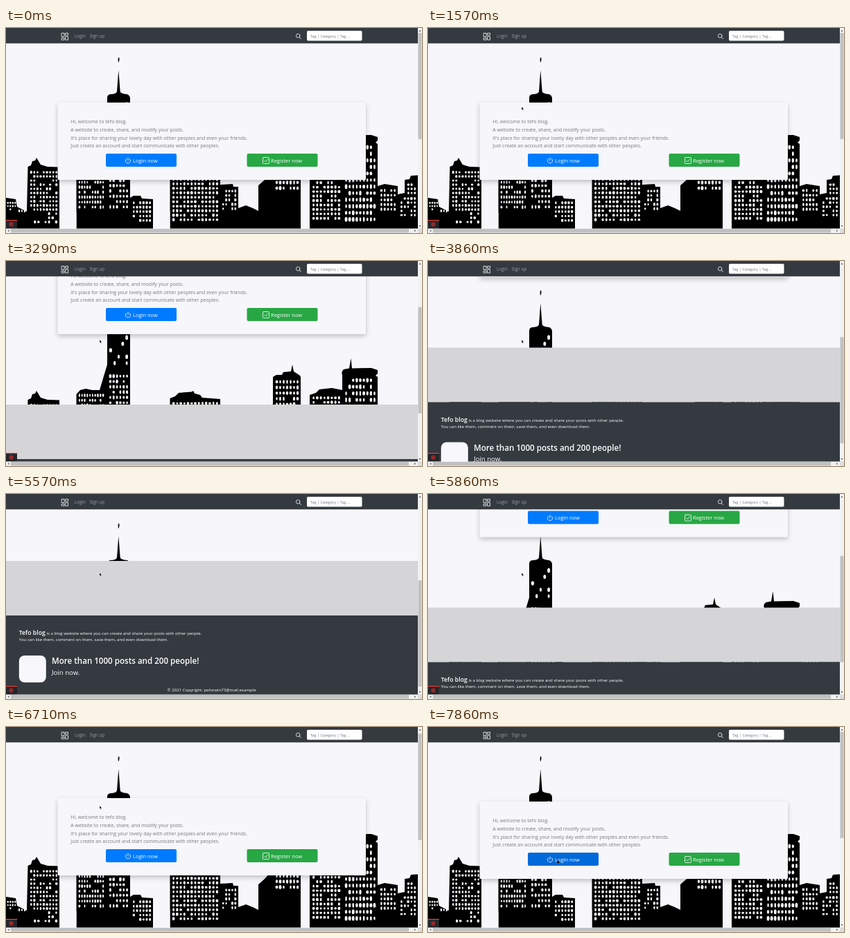
Write an HTML page that moves like this. It is 600 px wide and 297 px high and loops after 8 s.

```html
<!DOCTYPE html>
<html lang="en">
<head>
<meta charset="utf-8">
<title>Blog welcome page</title>
<style>
  html, body { margin: 0; height: 100%; overflow: hidden; background: #f7f6fa; }
  svg { display: block; width: 100vw; height: 100vh; }
  text { font-family: "Open Sans", "Noto Sans", sans-serif; fill: #fff; white-space: pre; }
  .lead text { font-size: 7.02px; fill: #777a7e; }
  .btn { font-size: 7.5px; }
  .small { font-size: 6.1px; }
  .line { fill: none; stroke: #fff; stroke-width: .8; stroke-linecap: round; }
  .card { fill: #f7f6fa; filter: drop-shadow(0 3px 3.5px rgba(0, 0, 0, .22)); }
</style>
</head>
<body>
<svg viewBox="0 0 600 297">
  <rect width="600" height="297" fill="#f7f6fa"/>

  <!-- fixed skyline -->
  <path d="M0 246 14 248 16 259 30 266 31.500 201 36 199 38 193 42 192 44 188 47 193 50 198 60 201 77 201.500V300H0Z
    M101.500 300V193L107 187 115 185 124 187 135 187 146 150V101Q146 97 150 96Q159 96 160 92L162.300 61 164.700 92Q165 95 175 96Q179 98 179 102V246L184 243 194 243 196 247 212 248V300Z
    M162 43Q163.500 41 163.500 46L162.500 50Q161 48 162 43Z
    M236.500 300V199L244 196 249 191 268 189.500 270 188 272 192 280 194 283 198 309 200V227L327 226 328 230 335 230V261L346 257 356 261 364 265V228L372 221 385 207V168L390 165 398 165 400 161 411 160 413 150 415 160 424 166 425 168V300Z
    M438 300V194L447 191 452 186 470 184 485 187V165Q483 161 487 157L495 155.500 497.500 141 499 155.500 527 155 536 158V163L533 166 536 168V229L546 226 565 229V241L575 239V220L582 219 584 214 600 213V300Z"/>
  <path d="M77 267 78 300H101.500V267ZM212 265V300H236.500V265ZM425.300 260V300H438V260Z" fill="#f7f6fa"/>
  <g id="windows" fill="#f7f6fa"></g>

  <!-- scrolling page -->
  <g id="page">
    <rect y="322" width="594" height="79" fill="#d5d4d7"/>
    <rect y="401" width="594" height="130" fill="#343a40"/>
    <rect class="card" x="74.500" y="108" width="444.500" height="112" rx="1.500"/>
    <g class="lead">
      <text x="93.300" y="138.300">Hi, welcome to tefo blog.</text>
      <text x="93.300" y="150">A website to create, share, and modify your posts.</text>
      <text x="93.300" y="161.700">It's place for sharing your lovely day with other peoples and even your friends.</text>
      <text x="93.300" y="173.300">Just create an account and start communicate with other peoples.</text>
    </g>
    <rect id="login" x="144" y="182" width="102" height="19" rx="2"/>
    <path class="line" d="M173.700 189.500A3.600 3.600 0 1 0 178.300 189.500M176 188V192"/>
    <text class="btn" x="183" y="194.500">Login now</text>
    <rect x="347.500" y="182" width="102" height="19" rx="2" fill="#28a745"/>
    <rect class="line" x="370.500" y="187.500" width="9" height="9" rx="1"/>
    <path class="line" d="M372.700 192 374.500 194 377.800 190"/>
    <text class="btn" x="382" y="194.500">Register now</text>

    <text class="small" x="18.800" y="429.200"><tspan font-size="8.700" font-weight="600">Tefo blog</tspan> is a blog website where you can create and share your posts with other people.</text>
    <text class="small" x="18.800" y="438.300">You can like them, comment on them, save them, and even download them.</text>
    <rect x="18.800" y="459" width="39" height="39" rx="8" fill="#f8f7fb"/>
    <text x="66" y="471.200" font-size="11.600" font-weight="600">More than 1000 posts and 200 people!</text>
    <text x="66" y="486.500" font-size="9.600">Join now.</text>
    <text class="small" x="296.700" y="511.300" text-anchor="middle">© 2021 Copyright: pelorwin73@mail.example</text>
  </g>

  <!-- navigation bar -->
  <rect width="594" height="22.300" fill="#343a40"/>
  <path class="line" d="M80.500 7.500h3.500v5h-3.500zM86 7.500h3.500v3h-3.500zM80.500 14.500h3.500v2.700h-3.500zM86 12.500h3.500v4.700h-3.500z"/>
  <g font-size="6.200">
    <text x="99" y="13.700" fill-opacity=".5">Login</text>
    <text x="120.700" y="13.700" fill-opacity=".5">Sign up</text>
  </g>
  <path class="line" d="M423.300 13.300 425.500 15.700M424 11.300a2.800 2.800 0 1 1-5.600 0a2.800 2.800 0 1 1 5.600 0"/>
  <rect x="434" y="4" width="79.500" height="14.500" rx="1.800" fill="#fff"/>
  <text x="439" y="13.600" font-size="5.450" style="fill:#6c757d">Tag | Category | Tag ...</text>

  <!-- corner badge -->
  <rect y="278" width="16" height="12.500" fill="#24262b"/>
  <rect y="278" width="16" height="1.200" fill="#e8403a"/>
  <circle cx="7.500" cy="284.500" r="3.200" fill="#8f2a2a"/>

  <g id="cursor" stroke="#fff" stroke-width=".35">
    <path id="arrow" d="M0 0V4.600L1.100 3.700 1.900 5.400 2.700 5 1.900 3.400H3.300Z"/>
    <path id="hand" d="M-.7 0Q0-.8.7 0V2L3 2.700V4.500L2.200 6H-.5L-2 3.500-1.500 2.800-.7 3.500Z"/>
  </g>

  <!-- scrollbars -->
  <path d="M594 0h6v297H0v-6.500H594Z" fill="#f1f1f1"/>
  <path d="M594 290.500h6v6.500h-6Z" fill="#dcdcdc"/>
  <g fill="#c1c1c1">
    <rect id="thumb" x="594.500" y="7" width="5" height="154"/>
    <rect x="7" y="291" width="574" height="5.500"/>
  </g>
  <path d="M595.500 5 597 3 598.500 5ZM595.500 286 597 288 598.500 286ZM4.500 292.300 2.500 293.800 4.500 295.300ZM589 292.300 591 293.800 589 295.300Z" fill="#505050"/>
</svg>

<script>
const $ = id => document.getElementById(id);

let seed = 7;
const rand = () => (seed = seed * 16807 % 2147483647) / 2147483647;

// Fill a facade with slightly uneven oval windows.
function facade(x, y, w, h, cols, rows, fill = .88) {
  const cw = w / cols, ch = h / rows;
  let d = '';
  for (let r = 0; r < rows; r++) for (let c = 0; c < cols; c++) {
    if (rand() > fill) continue;
    const rx = cw * (.24 + rand() * .16), ry = ch * (.24 + rand() * .14);
    const cx = x + (c + .5) * cw, cy = y + (r + .5) * ch;
    d += `M${cx - rx} ${cy}a${rx} ${ry} 0 1 0 ${2 * rx} 0a${rx} ${ry} 0 1 0 ${-2 * rx} 0`;
  }
  $('windows').innerHTML += `<path d="${d}"/>`;
}

[
  [1, 251, 14, 14, 4, 3], [17, 262, 12, 6, 3, 1],
  [34, 206, 41, 60, 9, 10], [34, 266, 41, 18, 8, 3, .6],
  [104, 191, 38, 72, 10, 10, .75], [148, 106, 29, 56, 5, 6, .3],
  [148, 163, 29, 100, 6, 13], [182, 250, 28, 32, 6, 5],
  [239, 203, 68, 78, 13, 12], [311, 233, 22, 32, 5, 5],
  [388, 171, 35, 65, 7, 8], [441, 195, 42, 84, 8, 13],
  [488, 168, 46, 114, 9, 12], [539, 232, 24, 34, 5, 5],
  [568, 244, 24, 30, 5, 5, .7], [578, 224, 14, 18, 3, 3]
].forEach(f => facade(...f));

// Keys are [tick, value...]; linear between them.
function at(keys, tick) {
  const i = keys.findIndex(k => k[0] > tick);
  if (i < 0) return keys[keys.length - 1].slice(1);
  if (!i) return keys[0].slice(1);
  const a = keys[i - 1], b = keys[i], p = (tick - a[0]) / (b[0] - a[0]);
  return a.slice(1).map((v, j) => v + (b[j + 1] - v) * p);
}

const FPS = 7, LOOP = 8000, NOTCH = 39.3, END = 234;
const scrollKeys = [
  [15, 0], [16, 9], [17, 32], [18, NOTCH], [20, NOTCH], [21, 52], [23, 114],
  [26, 188], [27, 5 * NOTCH], [31, 5 * NOTCH], [32, 215], [33, END],
  [38, END], [39, 225], [44, 56], [46, 5], [47, 0]
];
const cursorKeys = [
  [6, 330, 300], [11, 135, 114], [48, 135, 114], [52, 160, 152], [54, 183, 187], [55, 187, 192]
];

function draw(now) {
  const tick = Math.floor(now % LOOP * FPS / 1000 + .02);
  const [scroll] = at(scrollKeys, tick);
  const [x, y] = at(cursorKeys, tick);
  const hover = scroll === 0 && x > 144 && x < 246 && y > 182 && y < 201;
  $('page').setAttribute('transform', `translate(0 ${-scroll})`);
  $('thumb').setAttribute('y', 7 + scroll * .525);
  $('cursor').setAttribute('transform', `translate(${x} ${y})`);
  $('login').setAttribute('fill', hover ? '#0069d9' : '#007bff');
  $('arrow').style.display = hover ? 'none' : '';
  $('hand').style.display = hover ? '' : 'none';
}

const start = performance.now();
function loop() {
  draw(performance.now() - start);
  requestAnimationFrame(loop);
}
loop();
</script>
</body>
</html>
```
